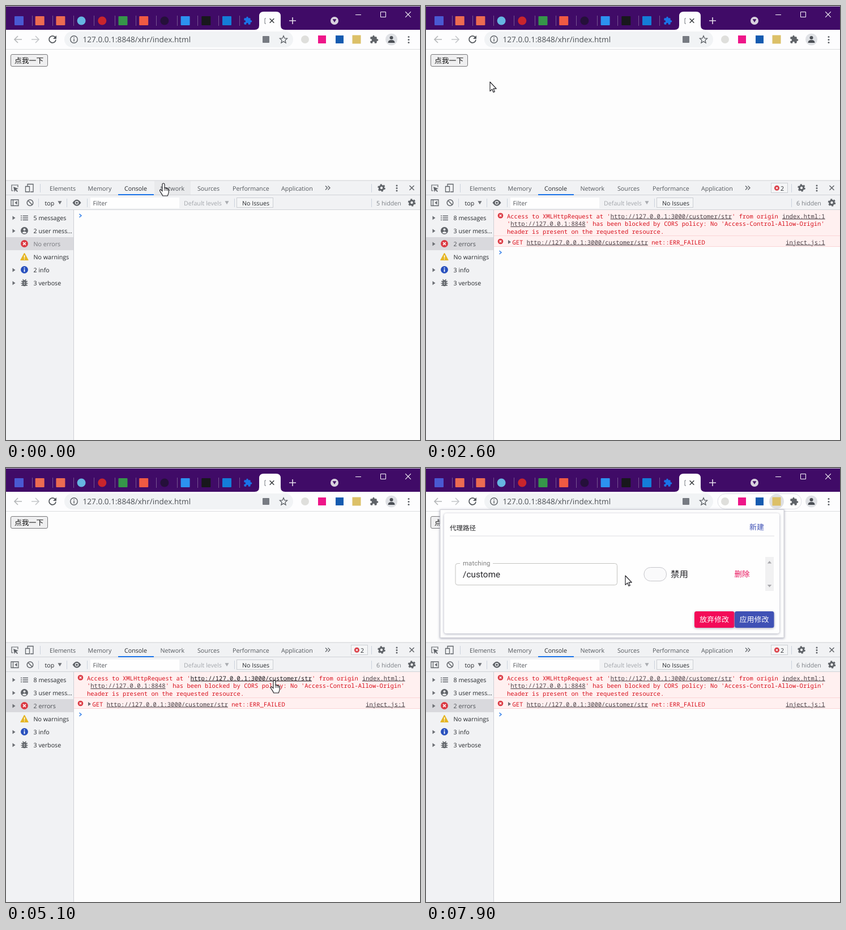
An HTML page for the animation above (8 s loop, 731x766 px).

```html
<!DOCTYPE html>
<html lang="zh">
<head>
<meta charset="utf-8">
<title>Request demo</title>
<style>
html, body { margin: 0; width: 100%; height: 100%; overflow: hidden; background: #fdfdfd; }
svg { display: block; width: 731px; height: 766px; }
text { font: 10.7px "Open Sans", "Noto Sans", sans-serif; fill: #25282c; white-space: pre; text-rendering: geometricPrecision; }
.mono text { font: 10.5px "Noto Sans Mono", "DejaVu Sans Mono", monospace; fill: #d8101c; }
.mono .link { fill: #4b4248; text-decoration: underline; }
.mono .hot { fill: #16161a; }
.cjk { font-family: "Noto Sans CJK SC", "Noto Sans CJK", sans-serif; }
.rob { font-family: Roboto, sans-serif; letter-spacing: .12px; }
</style>
</head>
<body>
<svg id="stage" viewBox="0 0 731 766" xmlns="http://www.w3.org/2000/svg"></svg>
<script>
const GREY = '#5f6368', PANEL = '#f1f2f4';
const rect = (x, y, w, h, fill, more = '') =>
  `<rect x="${x}" y="${y}" width="${w}" height="${h}" fill="${fill}" ${more}/>`;
const disc = (x, y, r, fill, more = '') => `<circle cx="${x}" cy="${y}" r="${r}" fill="${fill}" ${more}/>`;
const line = (d, color = GREY, width = 1.3, more = '') =>
  `<path d="${d}" fill="none" stroke="${color}" stroke-width="${width}" ${more}/>`;
const shape = (d, fill = GREY, more = '') => `<path d="${d}" fill="${fill}" ${more}/>`;
const text = (x, y, s, more = '') => `<text x="${x}" y="${y}" ${more}>${s}</text>`;
const cjk = (x, y, s, size, fill, more = '') =>
  text(x, y, s, `class="cjk" style="font-size:${size}px;fill:${fill};${more}"`);
const group = (id, body, more = '') => `<g id="${id}" ${more}>${body}</g>`;
const cross = (x, y, r, color, width) =>
  line(`M${x - r} ${y - r}l${2 * r} ${2 * r}m0 ${-2 * r}l${-2 * r} ${2 * r}`, color, width);
const right = (x, y) => shape(`M${x} ${y - 3.5}l5 3.5-5 3.5z`, '#6b6e73');
const down = (x, y, color = GREY, r = 3.5) => shape(`M${x - r} ${y - r * .8}h${2 * r}l${-r} ${r * 1.7}z`, color);
const dots = (x, y, gap) => [-gap, 0, gap].map(d => disc(x, y + d, 1.5, GREY)).join('');
const gear = (x, y) => disc(x, y, 3.7, 'none', `stroke="${GREY}" stroke-width="3"`) +
  disc(x, y, 5.7, 'none', `stroke="${GREY}" stroke-width="2.2" stroke-dasharray="2.98"`);
const errorIcon = (x, y, r) => disc(x, y, r, '#db3a43') + cross(x, y, r * .37, '#fff', r * .26);
const puzzle = (x, y, size, fill) => shape('M20.5 11H19V7c0-1.1-.9-2-2-2h-4V3.5a2.5 2.5 0 0 0-5 0V5H4a2 2 0 0 0-2 2v3.8h1.5a2.7 2.7 0 0 1 0 5.4H2V20a2 2 0 0 0 2 2h3.8v-1.5a2.7 2.7 0 0 1 5.4 0V22H17a2 2 0 0 0 2-2v-4h1.5a2.5 2.5 0 0 0 0-5z',
  fill, `transform="translate(${x - size / 2} ${y - size / 2}) scale(${size / 24})"`);
const star = (x, y) => {
  const pts = [...Array(10)].map((_, i) => {
    const a = i * Math.PI / 5, r = i % 2 ? 3.1 : 6.9;
    return `${x + r * Math.sin(a)} ${y - r * Math.cos(a)}`;
  });
  return line(`M${pts.join('L')}z`, GREY, 1.3);
};

function tabStrip() {
  const colors = ['#4a59d2', '#ec6b52', '#ec6b52', '#66b5e2', '#c9252c', '#36964a',
    '#f05a43', '#25103a', '#2c92f0', '#18181c', '#147dd8'];
  let s = rect(0, 0, 731, 42, '#400b67') + rect(0, 0, 731, 1, '#cbc3d2');
  colors.forEach((c, i) => {
    const x = 23 + i * 36.7;
    s += [3, 4, 7].includes(i) ? disc(x, 26, 7.5, c) : rect(x - 8, 18, 16, 16, c, 'rx="1"');
    s += rect(Math.round(45.5 + i * 36.6), 17, 1, 18, '#765491');
  });
  s += puzzle(427, 26, 16, '#1a73e8');
  s += shape('M439 42q8 0 8-8V18q0-8 8-8h22q8 0 8 8v16q0 8 8 8z', '#fdfdfe');
  s += line('M459 22h-2v9h2', '#777a80', 1) + cross(469.5, 26, 3.8, '#3c4043', 1.6);
  s += line('M500 26h12M506 20v12', '#e3dbe9', 1.6);
  s += disc(580, 26, 7, '#d9d2df') + down(580, 26, '#400b67', 3.3);
  s += line('M617 15.5h10', '#fff', 1) + line('M661.5 10.5h9v9h-9z', '#fff', 1) + cross(710, 15, 4.8, '#fff', 1.1);
  return s;
}

function toolbar() {
  let s = rect(0, 42, 731, 34, '#fdfdfe') + rect(0, 76, 731, 1, '#dcdde0');
  s += rect(103, 45, 404, 28, '#f1f3f5', 'rx="14"');
  s += line('M28 59H15m6-6l-6 6 6 6', '#b4b6b8', 1.6) + line('M45 59h13m-6-6l6 6-6 6', '#c4c6c9', 1.6);
  s += line('M87 55.5a6 6 0 1 0 1 4', '#53575c', 1.8) + shape('M89 52v6h-6z', '#53575c');
  s += disc(120, 59, 6.3, 'none', `stroke="${GREY}" stroke-width="1.4"`) + rect(119.3, 58, 1.5, 4.5, GREY) + rect(119.3, 55.3, 1.5, 1.5, GREY);
  s += text(135.5, 64, '127.0.0.1:8848/xhr/index.html', 'style="font-size:13.6px;fill:#4c5055"');
  s += rect(453, 53, 12, 12, '#777b82', 'rx="1"') + star(490, 59.5);
  s += group('pill', rect(515, 45.5, 148, 27, '#fefefe', 'rx="13.5" stroke="#dfe0e6"') + disc(619, 59, 13, '#dfe0e3'));
  s += disc(528, 59, 7, '#dfdfdc') + rect(551, 52, 14, 14, '#ee1689') + rect(582, 52, 14, 14, '#155bb0');
  s += rect(611.5, 51.5, 15, 15, '#dcc068') + puzzle(650, 59, 16, GREY);
  s += disc(680.5, 59, 10.5, '#dfe1e5') + disc(680.5, 56, 3, '#4b4f55') + shape('M674.5 65q0-5 6-5t6 5z', '#4b4f55');
  return s + dots(711, 59.5, 5);
}

function devtools() {
  let s = rect(0, 308, 731, 52, PANEL) + rect(0, 307.5, 731, 1, '#cdcfd4');
  s += group('netHover', rect(262, 309, 64, 24, '#e9eaec'));
  s += rect(0, 333, 731, 1, '#d0d2d6') + rect(0, 359, 731, 1, '#d0d2d6') + rect(198, 332, 63, 2, '#1a73e8');
  [[77, 'Elements'], [144.5, 'Memory'], [209, 'Console'], [272.5, 'Network'], [338, 'Sources'], [400, 'Performance'], [486, 'Application']]
    .forEach(([x, t]) => s += text(x, 325.5, t, `style="fill:${t === 'Console' ? '#25282c' : '#54585d'}"`));
  s += line('M564 317.5l3.5 3.5-3.5 3.5m4.5-7l3.5 3.5-3.5 3.5', GREY, 1.3);
  s += line('M13 326h-3v-10h11v4', GREY, 1.2) + shape('M13 319l9 3.5-4 1.3 3 3.2-1.3 1.2-3-3.2-1.7 3.5z');
  s += line('M38 318v-3.5h10V328h-5M34.5 318.5h7v9.5h-7z', GREY, 1.3);
  [[60, 314], [645, 314], [57, 340], [107, 340], [143, 340], [403, 340], [645, 340]]
    .forEach(([x, y]) => s += rect(x, y, 1, 15, '#cbd2dc'));
  s += gear(663, 321) + dots(690, 321.5, 4.5) + cross(716.5, 321, 4, GREY, 1.5);
  s += line('M9 342h13v10.5H9zM12.5 342v10.5', GREY, 1.3) + shape('M19.5 344v6.5l-4-3.2z');
  s += disc(42.5, 347.3, 5.3, 'none', `stroke="${GREY}" stroke-width="1.5"`) + line('M39 343.5l7.3 7.5', GREY, 1.5);
  s += text(68.5, 351.5, 'top') + down(95, 347, '#6e7176');
  s += shape('M117.5 347.3q7.5-11 15 0-7.5 11-15 0z') + disc(125, 347.3, 3.2, PANEL) + disc(125, 347.3, 1.9, GREY);
  s += rect(149, 338, 157, 19, '#fefefe') + text(153.5, 352, 'Filter', 'style="fill:#505358"');
  s += text(314, 351.5, 'Default levels', 'style="fill:#a4a7ac"') + down(390, 347, '#a9acb0');
  s += rect(407.5, 338.5, 64, 17, '#f4f5f6', 'stroke="#cbced3"') + text(417, 351.5, 'No Issues');
  return s + gear(716.5, 347);
}

function sidebar() {
  let s = rect(0, 360, 119, 406, PANEL) + rect(0, 408, 119, 23, '#d9d9dd') + rect(119, 360, 1, 406, '#cdcfd4');
  [374, 397, 466, 489].forEach(y => s += right(11.5, y));
  s += line('M29.5 370.5H39M29.5 374H39M29.5 377.5H39', GREY, 1.4) + line('M26 370.5h2M26 374h2M26 377.5h2', GREY, 1.4);
  s += disc(32.5, 396.5, 6.5, GREY) + disc(32.5, 394.5, 2, PANEL) + shape('M28.5 400q4-4 8 0-4 3-8 0z', PANEL);
  s += errorIcon(32.5, 419.5, 6.5);
  s += shape('M32.5 436l6.8 12.5H25.7z', '#e5b523', 'stroke="#e5b523" stroke-linejoin="round"') + rect(31.8, 440, 1.5, 4.5, '#fff') + rect(31.8, 445.8, 1.5, 1.5, '#fff');
  s += disc(32.5, 465.5, 6.5, '#2850bd') + rect(31.6, 464.5, 1.8, 4.8, '#fff') + rect(31.6, 461.5, 1.8, 1.8, '#fff');
  s += rect(29, 484, 7, 10.5, GREY, 'rx="3.3"') + line('M27 486h11M26.5 489.5h12M27 493h11M29.5 482.5l2 2m4-2l-2 2', GREY, 1.4) + line('M31 487.8h3m-3 3h3', PANEL, 1);
  return s + text(48.5, 447, 'No warnings') + text(48.5, 493, '3 verbose');
}

const counts = (messages, user, errors, info, hidden, color) =>
  text(48.5, 378, `${messages} messages`) + text(48.5, 401, `${user} user mess...`) +
  text(48.5, 424, errors, `style="fill:${color}"`) + text(48.5, 470, `${info} info`) +
  text(654, 351.5, `${hidden} hidden`, 'style="fill:#7c8086"');
const prompt = y => line(`M129.5 ${y - 3}l3.5 3-3.5 3`, '#2f7de8', 1.5);

function errors() {
  const link = (s, id = '') => `<tspan class="link" ${id}>${s}</tspan>`;
  const url = 'http://127.0.0.1:3000/customer/str';
  let s = rect(120, 360, 611, 65, '#fff0f0') + rect(120, 405, 611, 1, '#fbd5d6') + rect(120, 424, 611, 1, '#fbd5d6');
  s += errorIcon(131.5, 370, 4.8) + errorIcon(131.5, 415.5, 4.8) + right(145, 416.5);
  s += `<g class="mono">` +
    text(143, 374.5, `Access to XMLHttpRequest at '${link(url, 'id="url"')}' from origin`) +
    text(143, 388, `'${link('http://127.0.0.1:8848')}' has been blocked by CORS policy: No 'Access-Control-Allow-Origin'`) +
    text(143, 401.5, 'header is present on the requested resource.') +
    text(152.5, 420.5, `GET ${link(url)} net::ERR_FAILED`) +
    text(629, 374.5, link('index.html:1')) + text(635.3, 420.5, link('inject.js:1')) + '</g>';
  s += rect(609.5, 312.5, 29, 17, '#f4f5f6', 'stroke="#cbced3"') + errorIcon(619.5, 321.3, 4.5) + text(626, 325.5, '2');
  return s + right(11.5, 420) + counts(8, 3, '2 errors', 3, 6, '#4b4e53') + prompt(435);
}

function popup() {
  const shadow = 'style="filter:drop-shadow(0 1px 2px #70718c99)"';
  let s = rect(25, 73.5, 607, 226, '#fefefe', 'stroke="#cfd0d6" ' + shadow);
  s += rect(32, 80, 592, 212, '#fefefe', 'rx="4" ' + shadow) + rect(42, 119.5, 573, 1, '#e0e0e3');
  s += cjk(42, 109.5, '代理路径', 11.5, '#1c1c1f') + cjk(571, 109, '新建', 13, '#3f51b5');
  s += rect(52, 168.5, 285.5, 38, 'none', 'rx="4" stroke="#c3c3c0"') + rect(60, 166, 58, 5, '#fefefe');
  s += text(65, 172, 'matching', 'class="rob" style="font-size:11.4px;fill:#808080"');
  s += text(65, 192.5, '/custome', 'class="rob" style="font-size:15.2px;fill:#26262a"');
  s += rect(385, 175.5, 39.5, 24, '#fafafb', 'rx="11.5" stroke="#c6c6cb"') + cjk(432, 192.5, '禁用', 15.5, '#26262a');
  s += cjk(544.5, 191.5, '删除', 13.5, '#e9145d') + rect(599, 157, 15, 60, '#f1f1f2');
  s += shape('M602.8 168.5h7.4l-3.7-4.5zM602.8 206h7.4l-3.7 4.5z', '#a9a9ad');
  s += rect(474, 253, 70.5, 29, '#f30a58', 'rx="3.5" ' + shadow) + rect(545, 253, 69.5, 29, '#3f51b5', 'rx="3.5" ' + shadow);
  return s + cjk(483, 272, '放弃修改', 13, '#fff', 'font-weight:500') + cjk(553.5, 272, '应用修改', 13, '#fff', 'font-weight:500');
}

const outline = 'stroke="#17171c" stroke-width="1.1" stroke-linejoin="round"';
const pointers =
  group('arrow', shape('M0 0V16.3L3.7 12.8 6 18.3 8.3 17.3 6 11.9H11.2z', '#fff', outline)) +
  group('hand', shape('M-2 2a2 2 0 0 1 4 0V8.5a1.6 1.6 0 0 1 2.8.5 1.6 1.6 0 0 1 2.6.7 1.5 1.5 0 0 1 1.8 1.6V16c0 2-1.5 3.5-1.8 6H-1.5c-.5-3-4-6-5-9.2-.4-1.8 1.6-2.2 2.8-.7L-2 14z', '#fff', outline) +
    line('M2 8.5v4.5M4.8 9v4M7.4 9.8v3.4', '#17171c', .9));

document.getElementById('stage').innerHTML =
  rect(0, 0, 731, 766, '#fdfdfd') + tabStrip() + toolbar() +
  rect(8.5, 85.5, 65, 21, '#efeff0', 'id="button" rx="2.5" stroke="#77777a"') + cjk(15, 101, '点我一下', 12.8, '#111') +
  devtools() + sidebar() +
  group('idle', counts(5, 2, 'No errors', 2, 5, '#75767b') + prompt(370)) +
  group('failed', errors()) + group('popup', popup()) + pointers;

const $ = id => document.getElementById(id);
const show = (id, on) => $(id).style.display = on ? '' : 'none';

// Pointer stops: time, x, y
const stops = [[0, 278, 313], [100, 278, 313], [1400, 67, 103], [2400, 67, 103], [3400, 510, 401], [3700, 510, 401],
  [4400, 335, 374], [5000, 474, 375], [5400, 474, 375], [6000, 641, 72], [6200, 641, 72],
  [6700, 622, 60], [7300, 622, 60], [7800, 352, 190], [8000, 352, 190]];

function pointerAt(t) {
  const i = stops.findIndex(s => s[0] > t);
  const [t0, x0, y0] = stops[i - 1], [t1, x1, y1] = stops[i];
  const p = (t - t0) / (t1 - t0), e = p * p * (3 - 2 * p);
  return [x0 + (x1 - x0) * e, y0 + (y1 - y0) * e];
}

function draw(now) {
  const t = Math.floor(now % 8000 / 100) * 100;
  const [x, y] = pointerAt(t);
  const onTab = t < 300, onLink = t >= 4400 && t < 5600, sent = t >= 2100;
  const onButton = t < 3000 && x < 74 && y < 107;
  for (const id of ['arrow', 'hand']) {
    $(id).setAttribute('transform', `translate(${Math.round(x)} ${Math.round(y)})`);
    show(id, (id === 'hand') === (onTab || onLink));
  }
  show('netHover', onTab);
  show('idle', !sent);
  show('failed', sent);
  $('url').classList.toggle('hot', onLink);
  $('button').setAttribute('fill', t === 2000 ? '#f5f5f6' : onButton ? '#e4e4e6' : '#efeff0');
  $('button').setAttribute('stroke', onButton ? '#4f4f53' : '#77777a');
  show('pill', t >= 7000);
  const fade = t < 7100 ? 0 : t < 7200 ? .3 : t < 7300 ? .75 : 1;
  show('popup', fade > 0);
  $('popup').style.opacity = fade;
  $('popup').setAttribute('transform', `translate(0 ${fade < 1 ? -1 : 0})`);
}

const start = performance.now();
function tick() {
  draw(performance.now() - start);
  requestAnimationFrame(tick);
}
tick();
</script>
</body>
</html>
```
